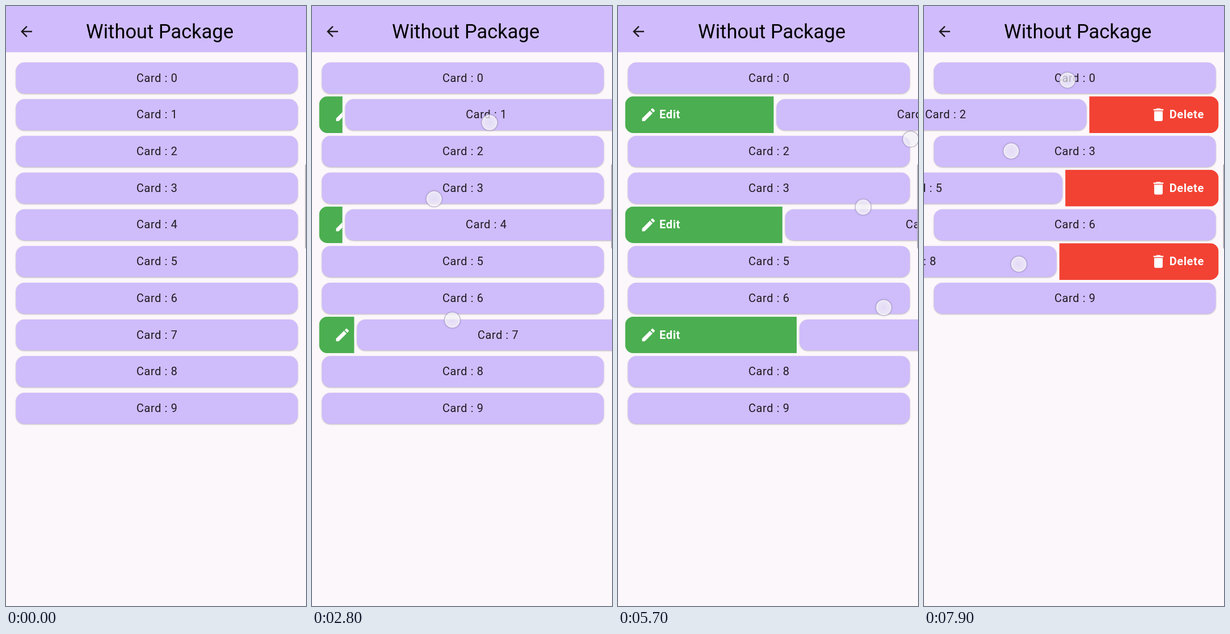
An HTML page that plays this animation: 529x1058 px, repeating every 8 s.

```html
<!DOCTYPE html>
<html lang="en">
<head>
<meta charset="utf-8">
<title>Swipe cards</title>
<style>
  html, body { margin: 0; width: 100%; height: 100%; overflow: hidden; background: #fcf7fa; }
  #stage { display: block; width: 100%; height: 100%; }
  text { font-family: Roboto, sans-serif; font-size: 20px; letter-spacing: .6px; }
  .card rect { fill: #cfbcfb; filter: drop-shadow(0 1.2px 1.2px rgba(0, 0, 0, .27)); }
  .card text { fill: #1d1b20; text-anchor: middle; }
  .action text { fill: #fff; font-weight: 700; }
  .action path { fill: #fff; }
  .touch { filter: drop-shadow(0 0 1.5px rgba(90, 70, 130, .25)); }
</style>
</head>
<body>
<svg id="stage" viewBox="0 0 529 1058">
  <defs>
    <radialGradient id="glow">
      <stop offset="0" stop-color="#fff" stop-opacity=".58"/>
      <stop offset=".7" stop-color="#fff" stop-opacity=".68"/>
      <stop offset="1" stop-color="#fff" stop-opacity=".85"/>
    </radialGradient>
  </defs>
  <rect width="529" height="1058" fill="#fcf7fa"/>
  <rect width="529" height="81.5" fill="#d0bcfc"/>
  <path transform="translate(21 30) scale(1.25)" fill="#1d1b20"
    d="M20 11H7.83l5.59-5.59L12 4l-8 8 8 8 1.41-1.41L7.83 13H20v-2z"/>
  <text x="271.2" y="57.2" text-anchor="middle" style="font-size:34.5px;letter-spacing:0">Without Package</text>
  <g id="list"></g>
  <rect x="527.6" y="279" width="5" height="149" rx="2" fill="#aaa4ad"/>
  <g id="touches"></g>
</svg>
<script>
const LOOP = 8000, STEP = 100, LAG = 32, FLING = 100, COLLAPSE = 300;
const TOP = 94.6, SLOT = 64.72, LEFT = 12.5, WIDTH = 507, PAD = 5;
const PENCIL = 'M3 17.25V21h3.75L17.81 9.94l-3.75-3.75L3 17.25zM20.71 7.04c.39-.39.39-1.02 0-1.41l-2.34-2.34c-.39-.39-1.02-.39-1.41 0l-1.83 1.83 3.75 3.75 1.83-1.83z';
const BIN = 'M6 19c0 1.1.9 2 2 2h8c1.1 0 2-.9 2-2V7H6v12zM19 4h-3.5l-1-1h-5l-1 1H5v2h14V4z';

// Each gesture swings between turning points; every finger scales and shifts that swing.
const gestures = [
  {
    turns: [[950, 0], [1655, 215], [2360, -110], [3300, 226], [3700, 226], [4495, -170], [5500, 262]],
    lanes: [
      { card: 1, x: 254, y: 197, tilt: .144, scale: 1, shift: 0, gone: 5934 },
      { card: 4, x: 155, y: 336, tilt: .067, scale: 1.07, shift: -3, gone: 5865 },
      { card: 7, x: 166, y: 562, tilt: -.1, scale: 1.09, shift: 17, gone: 5865 }
    ]
  },
  {
    turns: [[6970, 0], [7550, -228]],
    lanes: [
      { card: 2, x: 481, y: 182, tilt: .225, scale: 1, shift: 0 },
      { card: 5, x: 424, y: 307, tilt: .19, scale: 1.26, shift: 17 },
      { card: 8, x: 448, y: 422, tilt: -.118, scale: 1.1, shift: -30 }
    ]
  }
];

const clamp = (v, a = 0, b = 1) => Math.min(b, Math.max(a, v));
const mix = (a, b, u) => a + (b - a) * u;

function set(el, attrs) {
  for (const k in attrs) el.setAttribute(k, attrs[k]);
}

function add(parent, tag, attrs = {}, text) {
  const el = document.createElementNS('http://www.w3.org/2000/svg', tag);
  set(el, attrs);
  if (text) el.textContent = text;
  return parent.appendChild(el);
}

function swing(turns, t) {
  let i = 0;
  while (i < turns.length - 2 && t > turns[i + 1][0]) i++;
  const [t0, a] = turns[i], [t1, b] = turns[i + 1];
  return mix(a, b, .5 - .5 * Math.cos(Math.PI * clamp((t - t0) / (t1 - t0))));
}

function drag(turns, lane, t) {
  const ramp = clamp((t - turns[0][0]) / 200);
  return lane.scale * swing(turns, t) + lane.shift * ramp;
}

// Cubic bezier (.25, .1, .25, 1).
function ease(x) {
  let lo = 0, hi = 1;
  for (let i = 0; i < 20; i++) {
    const s = (lo + hi) / 2, r = 1 - s;
    if (.75 * s * r * r + .75 * s * s * r + s ** 3 < x) lo = s; else hi = s;
  }
  return .3 * lo * (1 - lo) ** 2 + 3 * lo * lo * (1 - lo) + lo ** 3;
}

function makeAction(parent, color, icon, iconX, label, labelX) {
  const view = add(parent, 'svg', { class: 'action', overflow: 'hidden' });
  const body = add(view, 'g');
  add(body, 'rect', { x: LEFT, width: WIDTH, height: SLOT, rx: 15, fill: color });
  add(body, 'path', { d: icon, transform: `translate(${iconX} 17.4) scale(1.25)` });
  add(body, 'text', { x: labelX, y: 39 }, label);
  return { view, body };
}

const list = document.getElementById('list');
const cards = Array.from({ length: 10 }, (_, i) => {
  const edit = makeAction(list, '#4bae50', PENCIL, 38.7, 'Edit', 73.1);
  const del = makeAction(list, '#f24233', BIN, 398.4, 'Delete', 432.7);
  const face = add(list, 'g', { class: 'card' });
  add(face, 'rect', { x: LEFT + PAD, y: PAD, width: WIDTH - 2 * PAD, height: SLOT - 2 * PAD, rx: 15 });
  add(face, 'text', { x: 266.3, y: 39 }, 'Card : ' + i);
  const gesture = gestures.find(g => g.lanes.some(l => l.card === i));
  const lane = gesture && gesture.lanes.find(l => l.card === i);
  return { edit, del, face, gesture, lane };
});

const layer = document.getElementById('touches');
const makeTouch = () => add(layer, 'circle', {
  class: 'touch', r: 14, fill: 'url(#glow)', stroke: '#8f83ad', 'stroke-opacity': .5, 'stroke-width': 1.4
});
for (const { lanes } of gestures) lanes.forEach(lane => lane.touch = makeTouch());
const stray = makeTouch();
set(stray, { cx: 336, cy: 573, 'stroke-opacity': .15 });

function place(action, x, y, w, h) {
  set(action.view, { x, y, width: Math.max(0, w), height: h, display: w > 0 && h > 0 ? 'inline' : 'none' });
  set(action.body, { transform: `translate(${-x} ${(h - SLOT) / 2})` });
}

function drawCards(t) {
  let y = TOP;
  for (const { edit, del, face, gesture, lane } of cards) {
    const gone = lane && lane.gone || Infinity;
    const fling = clamp((t - gone) / FLING + 1);
    const dx = lane ? mix(drag(gesture.turns, lane, t), WIDTH, fling) : 0;
    const p = clamp((t - gone) / COLLAPSE);
    const h = SLOT * (1 - ease(clamp((p - .4) / .6)));
    place(edit, LEFT, y, dx, h);
    place(del, LEFT + WIDTH + dx, y, -dx, h);
    set(face, { transform: `translate(${dx} ${y})`, display: t >= gone ? 'none' : 'inline' });
    y += p < 1 ? h : 0;
  }
}

function drawTouches(t) {
  for (const { turns, lanes } of gestures) for (const lane of lanes) {
    const d = drag(turns, lane, t + LAG);
    const release = (lane.gone || Infinity) - FLING;
    set(lane.touch, {
      cx: lane.x + d,
      cy: lane.y + lane.tilt * d,
      opacity: clamp((t - turns[0][0]) / 100 + 1) * clamp(1 - (t - release) / 200)
    });
  }
  set(stray, { opacity: t < 1700 ? 0 : clamp((2100 - t) / 300) });
}

const begin = performance.now();
function tick() {
  const t = Math.floor((performance.now() - begin) % LOOP / STEP) * STEP;
  drawCards(t);
  drawTouches(t);
  requestAnimationFrame(tick);
}
tick();
</script>
</body>
</html>
```
